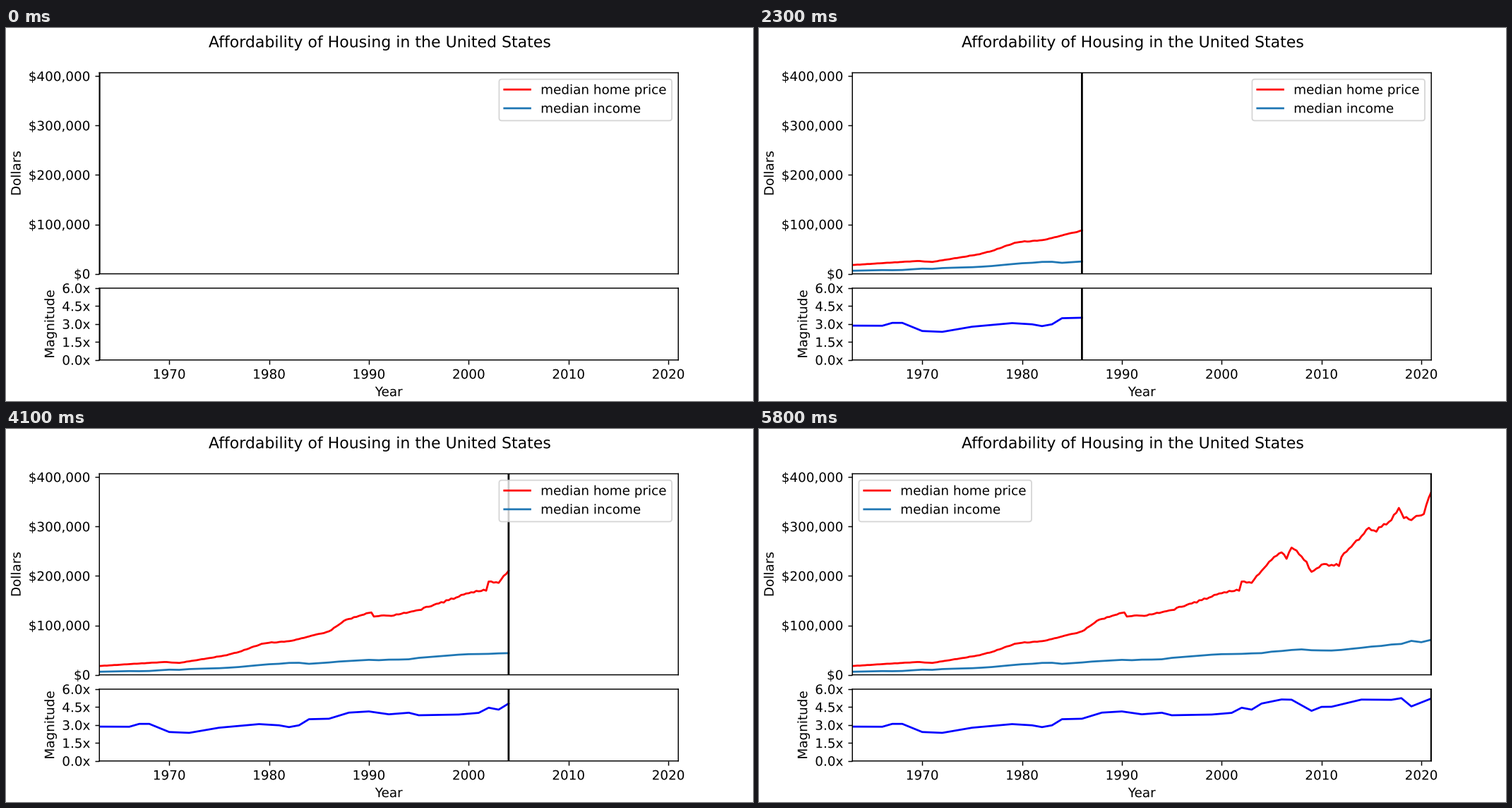
These frames come from a looping animation (1058 by 529 pixels, 5.9 s). A matplotlib script:

```python
import numpy as np
import matplotlib.pyplot as plt
from matplotlib.animation import FuncAnimation
from matplotlib.patheffects import Normal
from matplotlib.text import Text

# Smooth sub-pixel edges for lines and letters
plt.rcParams.update({"font.family": "DejaVu Sans", "text.hinting": "none",
                     "path.snap": False})
START, END = 1963, 2021
TOP = 369.8 * 1.1

# Turning points of the home price, in thousands
price_keys = [
    (1963, 17.8), (1969.5, 25.9), (1971, 24), (1975.5, 38.8), (1977, 46.3),
    (1979.5, 64), (1982.25, 68.5), (1986, 88), (1987.75, 111.5),
    (1990.25, 126.8), (1990.5, 118.5), (1992.5, 120), (1995, 131),
    (1998, 151), (2000, 165), (2001.75, 172), (2002, 188.7), (2003, 186),
    (2004.75, 228.8), (2006, 247.7), (2006.5, 237), (2007, 257.4),
    (2008.25, 235), (2009, 208.4), (2010, 222.9), (2011.75, 222),
    (2012, 238.4), (2014.75, 296), (2015.25, 289), (2017, 313),
    (2017.75, 337.9), (2018.25, 318), (2019, 313), (2020.25, 325),
    (2021, 369.8)]

# Turning points of price over income
ratio_keys = [
    (1963, 2.87), (1966, 2.86), (1967, 3.1), (1968, 3.1), (1970, 2.42),
    (1972, 2.35), (1975, 2.78), (1979, 3.08), (1981, 2.98), (1982, 2.83),
    (1983, 2.98), (1984, 3.49), (1986, 3.53), (1988, 4.04), (1990, 4.14),
    (1992, 3.9), (1994, 4.03), (1995, 3.82), (1999, 3.88), (2001, 4.02),
    (2002, 4.45), (2003, 4.29), (2004, 4.8), (2006, 5.14), (2007, 5.12),
    (2009, 4.19), (2010, 4.52), (2011, 4.53), (2014, 5.13), (2017, 5.11),
    (2018, 5.25), (2019, 4.56), (2021, 5.22)]


def curve(keys, x):
    return np.interp(x, *zip(*keys))


quarters = np.arange(START, END + 0.1, 0.25)
years = quarters[::4]
price = curve(price_keys, quarters)
ratio = curve(ratio_keys, years)
income = price[::4] / ratio

# Quarterly wobble that leaves the first quarter of each year in place
wobble = np.random.default_rng(4).uniform(-0.012, 0.012, len(quarters))
wobble[::4] = 0
price *= 1 + wobble

fig = plt.figure(figsize=(8, 4), dpi=132.25, facecolor="white")
fig.suptitle("Affordability of Housing in the United States")
ax = fig.add_axes([0.125, 0.11 + 0.3 * 0.77, 0.775, 0.7 * 0.77])
low = fig.add_axes([0.125, 0.11, 0.775, 0.25 * 0.77])

ax.set(xlim=(START, END), ylim=(0, TOP), ylabel="Dollars", xticks=[])
ax.set_yticks(range(0, 401, 100),
              ["$0"] + [f"${k},000" for k in range(100, 401, 100)])
low.set(xlim=(START, END), ylim=(0, 6), xlabel="Year", ylabel="Magnitude")
low.set_xticks(range(1970, 2021, 10))
ticks = np.arange(0, 6.1, 1.5)
low.set_yticks(ticks, [f"{t:.1f}x" for t in ticks])

price_line, = ax.plot([], [], color="red", label="median home price")
income_line, = ax.plot([], [], color="#1f77b4", label="median income")
ratio_line, = low.plot([], [], color="blue")
cursors = [a.axvline(START, color="black") for a in (ax, low)]
legend = ax.legend(loc="upper right")

# Drawing letters as outlines keeps their exact positions
for text in fig.findobj(Text):
    text.set_path_effects([Normal()])


def update(i):
    n = i + 1
    price_line.set_data(quarters[:4 * i + 1], price[:4 * i + 1])
    income_line.set_data(years[:n], income[:n])
    ratio_line.set_data(years[:n], ratio[:n])
    for c in cursors:
        c.set_xdata([years[i]] * 2)
    # The legend steps aside once the price line reaches it
    legend.set_loc("upper left" if years[i] >= 2017 else "upper right")
    return [price_line, income_line, ratio_line, legend, *cursors]


def reset():
    return update(0)


anim = FuncAnimation(fig, update, frames=len(years), init_func=reset,
                     interval=100, repeat=True, repeat_delay=0, blit=False)
plt.show()
```
